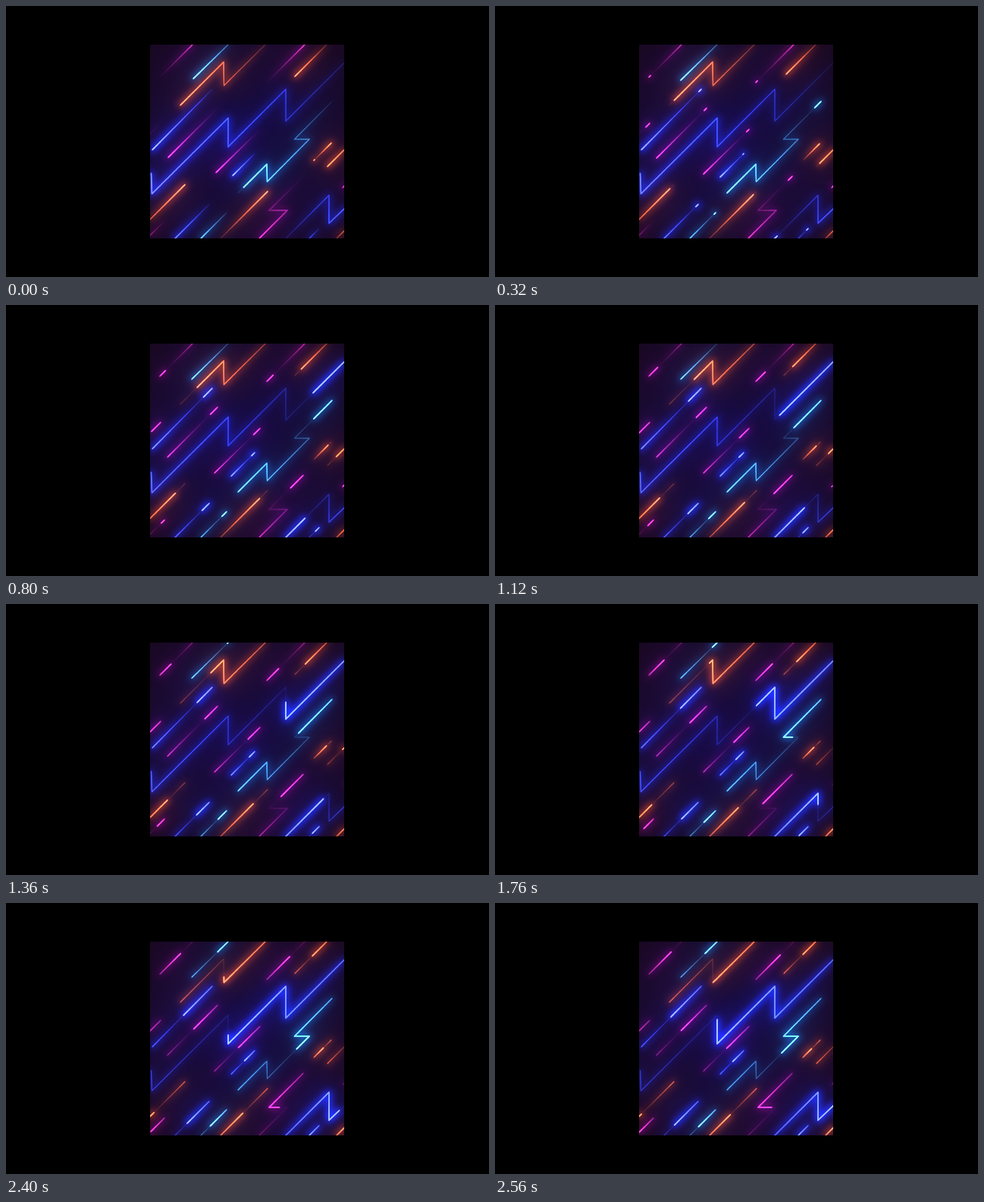
These frames come from a looping animation (637 by 358 pixels, 2.64 s). An HTML page with a canvas:

```html
<!DOCTYPE html>
<html>
<head>
<meta charset="utf-8">
<title>Neon lines</title>
<style>
  html, body { margin: 0; width: 100%; height: 100%; overflow: hidden; background: #000; }
  canvas { display: block; }
</style>
</head>
<body>
<canvas id="stage" width="637" height="358"></canvas>
<script>
const WIDTH = 637, HEIGHT = 358;
const LOOP = 2640, TICK = 80, SPAN = 2560, PERIOD = 4900;
const BOX = { x: 190, y: 51, size: 256 };

// Tube colour, whiteness of its hot end, halo colour, and how light falls off behind the edge
const BLUE = { rgb: [35, 70, 250], white: 110, halo: [12, 42, 255], fall: 0.5 };
const CYAN = { rgb: [60, 165, 205], white: 80, halo: [0, 85, 135], fall: 0.55 };
const ORANGE = { rgb: [235, 95, 20], white: 55, halo: [165, 52, 0], fall: 0.7 };
const PINK = { rgb: [200, 25, 150], white: 45, halo: [85, 0, 70], fall: 1.2 };

// [tube, edge distance at 0 ms, edge distance at SPAN, x, y, x, y, ...]
const tubes = [
  [BLUE, -48, 291, 446, 75, 369, 152, 369, 110, 293, 186, 293, 148, 192.5, 248, 191.5, 221],
  [BLUE, -3, 57, 272, 110, 193, 190],
  [BLUE, -1, 21, 328, 195, 297, 226],
  [BLUE, -2, 45, 268, 262, 222, 308],
  [BLUE, -14, 148, 368, 308, 426, 250, 426, 287, 447, 267],
  [BLUE, -1, 25, 413, 294, 400, 307],
  [CYAN, -23, 22.6, 293, 51, 245, 98],
  [CYAN, -4, 121, 430, 126, 380.5, 176, 400, 176, 344.5, 232, 344, 209, 306, 247],
  [CYAN, -2, 32, 291, 273, 257, 307],
  [ORANGE, 193.5, 77, 342, 51, 287.5, 105, 287, 74, 230, 131],
  [ORANGE, 59, 24, 423, 51, 381, 93],
  [ORANGE, 66, 4, 190, 282, 236, 236],
  [ORANGE, 32.5, 16, 406, 204, 429, 181],
  [ORANGE, 31, -21, 446, 190, 424, 212],
  [ORANGE, 88, 38, 283, 307, 345, 245],
  [ORANGE, 40, 14, 436, 307, 446, 297],
  [PINK, -3, 42, 203, 94, 246, 51],
  [PINK, -4, 46, 344, 101, 394, 51],
  [PINK, -2, 47, 279, 135, 213, 201],
  [PINK, -1, 42, 335, 163, 275, 222],
  [PINK, 0, 56, 204, 155, 190, 169],
  [PINK, -3, 82, 392, 225, 347, 270, 371, 270, 334, 307],
  [PINK, -4, 28, 209, 284, 190, 303],
  [PINK, 20, 12, 444, 240, 447, 237]
];

const ctx = document.getElementById('stage').getContext('2d');
const cores = makeLayer(), halos = makeLayer();

function makeLayer() {
  const canvas = document.createElement('canvas');
  canvas.width = WIDTH;
  canvas.height = HEIGHT;
  const pen = canvas.getContext('2d');
  pen.lineCap = 'round';
  return pen;
}

function clear(pen) {
  pen.globalCompositeOperation = 'source-over';
  pen.fillStyle = '#000';
  pen.fillRect(0, 0, WIDTH, HEIGHT);
  pen.globalCompositeOperation = 'lighten';
}

function dash(pen, rgb, width, x, y, dx, dy) {
  pen.strokeStyle = `rgb(${rgb.map(c => Math.min(255, Math.round(c)))})`;
  pen.lineWidth = width;
  pen.beginPath();
  pen.moveTo(x, y);
  pen.lineTo(x + dx, y + dy);
  pen.stroke();
}

const mod = (a, n) => ((a % n) + n) % n;

function drawTube([tube, from, to, ...pts], t) {
  const edge = from + (to - from) * t / SPAN;
  const wave = Math.abs(to - from) * PERIOD / SPAN;
  let start = 0;
  for (let i = 0; i + 3 < pts.length; i += 2) {
    const [x0, y0, x1, y1] = pts.slice(i, i + 4);
    const length = Math.hypot(x1 - x0, y1 - y0);
    const steps = Math.ceil(length / 1.5);
    const dx = (x1 - x0) / steps, dy = (y1 - y0) / steps;
    for (let k = 0; k < steps; k++) {
      const heat = 1 - mod(edge - start - (k + 0.5) * length / steps, wave) / wave;
      const light = heat ** tube.fall;
      const x = x0 + dx * k, y = y0 + dy * k;
      dash(cores, tube.rgb.map(c => c * light + tube.white * heat ** 2), 0.9 + 0.8 * heat, x, y, dx, dy);
      dash(halos, tube.halo.map(c => c * heat), 6, x, y, dx, dy);
    }
    start += length;
  }
}

function drawBackdrop() {
  const { x, y, size } = BOX;
  const shade = ctx.createRadialGradient(x + 115, y + 125, 20, x + 128, y + 128, 185);
  shade.addColorStop(0, '#150a3c');
  shade.addColorStop(0.6, '#180a30');
  shade.addColorStop(1, '#180820');
  ctx.fillStyle = shade;
  ctx.fillRect(x, y, size, size);
}

function addLight(pen, blur) {
  ctx.filter = blur ? `blur(${blur}px)` : 'none';
  ctx.drawImage(pen.canvas, 0, 0);
}

function draw(t) {
  clear(cores);
  clear(halos);
  tubes.forEach(tube => drawTube(tube, t));

  ctx.fillStyle = '#000';
  ctx.fillRect(0, 0, WIDTH, HEIGHT);
  ctx.save();
  ctx.beginPath();
  ctx.rect(BOX.x, BOX.y, BOX.size, BOX.size);
  ctx.clip();
  drawBackdrop();
  ctx.globalCompositeOperation = 'lighter';
  addLight(halos, 18);
  addLight(halos, 5);
  addLight(cores, 0);
  ctx.restore();
}

let shown = -1;
function frame(now) {
  const t = Math.floor((now % LOOP) / TICK) * TICK;
  if (t !== shown) draw(shown = t);
  requestAnimationFrame(frame);
}
draw(0);
requestAnimationFrame(frame);
</script>
</body>
</html>
```
